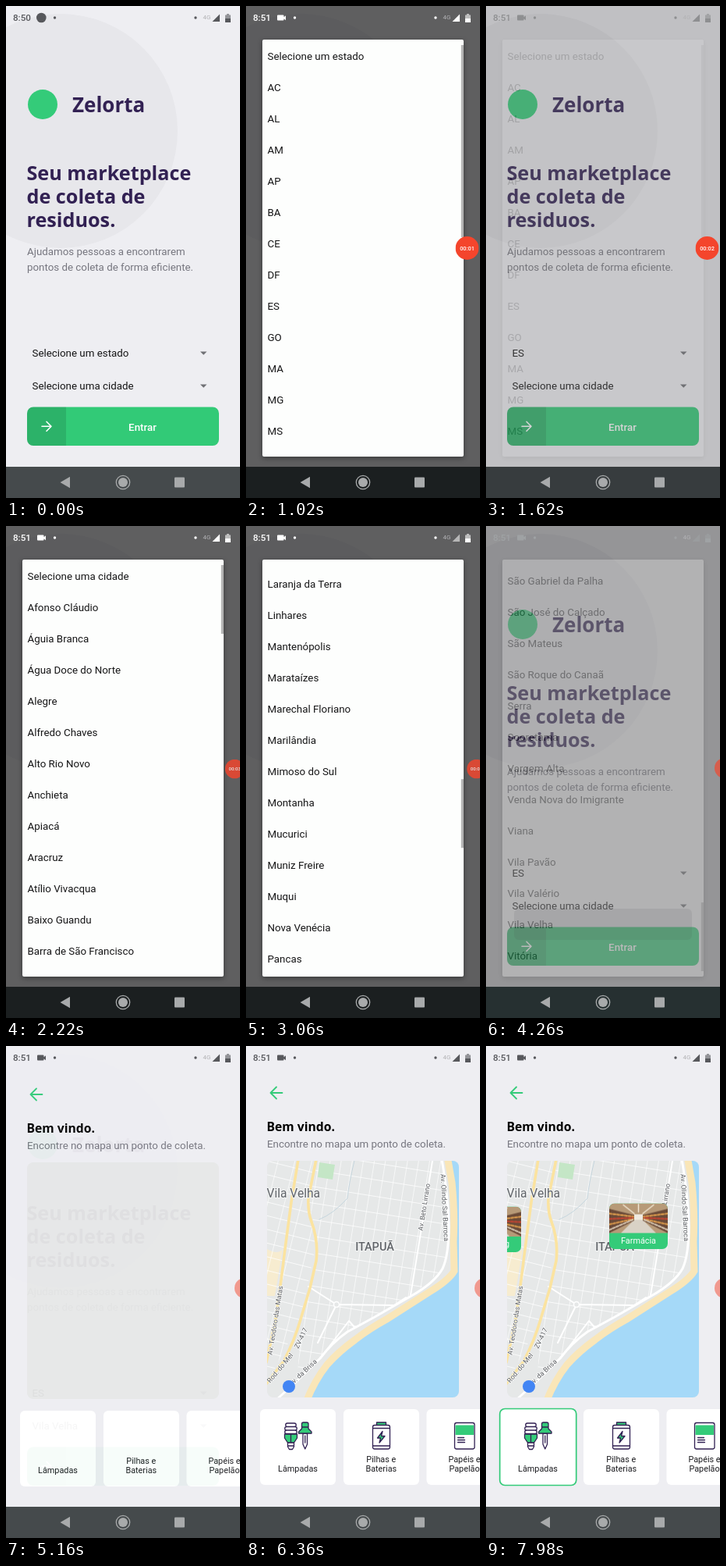
These frames come from a looping animation (300 by 630 pixels, 8 s). An HTML page:

```html
<!DOCTYPE html>
<html lang="pt-BR">
<head>
<meta charset="utf-8">
<title>Coleta de resíduos</title>
<style>
html, body { margin: 0; width: 300px; height: 630px; overflow: hidden; background: #eeeef2; }
svg { display: block; font: 13.33px Roboto, sans-serif; }
.title { font-family: "Open Sans", sans-serif; font-weight: 700; }
.mid { text-anchor: middle; }
.grey { fill: #76767f; }
.small { font-size: 10.83px; text-anchor: middle; fill: #1c1c20; }
.street text { font-size: 8.8px; fill: #55585c; stroke: #fff; stroke-width: 1.4px; paint-order: stroke; }
.place { fill: #5f6368; stroke: #f4f5f5; stroke-width: 2px; paint-order: stroke; }
.line { fill: none; stroke-linecap: round; stroke-linejoin: round; }
.dialog { transform-origin: 150px 310px; }
.paper { fill: #fdfefd; filter: drop-shadow(0 2px 3px #0006); }

[class*="a-"] { animation: 8s linear infinite; }
.a-dim { animation-name: dim; }
.a-nav { animation-name: nav; }
.a-ink { animation-name: ink; }
.a-states { animation-name: states; }
.a-cities { animation-name: cities; }
.a-scroll { animation-name: scroll; animation-timing-function: cubic-bezier(.3, .4, .5, 1); }
.a-thumb { animation-name: thumb; animation-timing-function: cubic-bezier(.3, .4, .5, 1); }
.a-bubble { animation-name: bubble; }
.a-page { animation-name: page; animation-timing-function: ease-out; }
.a-press { animation-name: press; }
.a-tap { animation-name: tap; }
.a-roads { animation-name: roads; }
.a-names { animation-name: names; }
.a-toast { animation-name: toast; }
.a-signal, .a-before, .a-after, .a-noState, .a-state, .a-noCity, .a-city,
.a-icons, .a-picked, .a-photo { animation-timing-function: step-end; }
.a-signal { animation-name: signal; }
.a-before { animation-name: before; }
.a-after { animation-name: after; }
.a-noState { animation-name: noState; }
.a-state { animation-name: state; }
.a-noCity { animation-name: noCity; }
.a-city { animation-name: city; }
.a-icons { animation-name: icons; }
.a-picked { animation-name: picked; }
.a-photo { animation-name: photo; }

@keyframes dim {
  0%, 10.5%, 21%, 23.25%, 54.75%, 100% { opacity: 0; }
  12.4%, 18.75%, 25.2%, 52.5% { opacity: .6; }
  53.25% { opacity: .38; }
}
@keyframes nav {
  0%, 10.5%, 21%, 23.25%, 54.75%, 100% { fill: #454a4c; }
  12.4%, 18.75%, 25.2%, 52.5% { fill: #1b1f20; }
  53.25% { fill: #263031; }
}
@keyframes ink {
  0%, 10.5%, 21%, 23.25%, 54.75%, 100% { fill: #57585c; }
  12.4%, 18.75%, 25.2%, 52.5% { fill: #fff; }
  53.25% { fill: #a0a3a5; }
}
@keyframes states {
  0%, 10.5% { opacity: 0; transform: scale(.94); }
  12.4%, 18.75% { opacity: 1; transform: none; }
  19.5% { opacity: .28; }
  21%, 100% { opacity: 0; transform: none; }
}
@keyframes cities {
  0%, 23.25% { opacity: 0; transform: scale(.94); }
  25.2%, 52.5% { opacity: 1; transform: none; }
  53.25% { opacity: .28; }
  54.75%, 100% { opacity: 0; transform: none; }
}
@keyframes scroll {
  0%, 30.75% { transform: none; }
  38.25% { transform: translateY(-1668.5px); }
  42.5% { transform: translateY(-1960px); }
  50%, 100% { transform: translateY(-2633.5px); }
}
@keyframes thumb {
  0%, 30.75% { transform: none; }
  38.25% { transform: translateY(274px); }
  42.5% { transform: translateY(322px); }
  50%, 100% { transform: translateY(432px); }
}
@keyframes bubble {
  0%, .75% { opacity: 0; transform: translate(283.5px, 310px); }
  3%, 24% { opacity: 1; transform: translate(283.5px, 310px); }
  27% { opacity: .82; transform: translate(293px, 311px) scale(.82); }
  38.25%, 44% { opacity: .82; transform: translate(295.5px, 311px) scale(.82); }
  52.5% { opacity: .7; transform: translate(306px, 310px) scale(.87); }
  65%, 100% { opacity: .5; transform: translate(306px, 310px) scale(.87); }
}
@keyframes page {
  0%, 60.5% { opacity: 0; transform: translateY(50px); }
  65.25%, 100% { opacity: 1; transform: none; }
}
@keyframes press { 0%, 59%, 62%, 100% { opacity: 1; } 60% { opacity: .7; } }
@keyframes tap { 0%, 89%, 92.25%, 100% { opacity: 1; } 90.2% { opacity: .5; } }
@keyframes roads { 0%, 68.25% { opacity: 0; } 75%, 100% { opacity: 1; } }
@keyframes names { 0%, 74% { opacity: 0; } 78%, 100% { opacity: 1; } }
@keyframes toast { 0%, 52.5%, 54.75%, 100% { opacity: 0; } 53.25% { opacity: .1; } }
@keyframes signal { 0%, 54%, 100% { opacity: 1; } 32.25% { opacity: .55; } }
@keyframes before { 0% { opacity: 1; } .75%, 100% { opacity: 0; } }
@keyframes after { 0% { opacity: 0; } .75%, 100% { opacity: 1; } }
@keyframes noState { 0% { opacity: 1; } 18.75%, 100% { opacity: 0; } }
@keyframes state { 0% { opacity: 0; } 18.75%, 100% { opacity: 1; } }
@keyframes noCity { 0% { opacity: 1; } 54%, 100% { opacity: 0; } }
@keyframes city { 0% { opacity: 0; } 54%, 100% { opacity: 1; } }
@keyframes icons { 0% { opacity: 0; } 68.25%, 100% { opacity: 1; } }
@keyframes picked { 0% { opacity: 0; } 92.25%, 100% { opacity: 1; } }
@keyframes photo { 0% { opacity: 0; } 94.5%, 100% { opacity: 1; } }
</style>
</head>
<body>
<svg width="300" height="630" viewBox="0 0 300 630">
  <defs>
    <clipPath id="sheet"><rect x="21" y="43" width="258" height="534" rx="2"/></clipPath>
    <clipPath id="mapBox"><rect x="27" y="147" width="246" height="303" rx="8"/></clipPath>
    <clipPath id="town"><path d="M89 140H251L260 200V250L251 287L212 320L130 366L66 425L70 350L90 275L91 250L80 195Z"/></clipPath>
    <clipPath id="west"><path d="M27 147H89L80 195L91 250L70 350L27 432Z"/></clipPath>
    <clipPath id="pin"><rect width="75" height="58.5" rx="7"/></clipPath>
    <pattern id="blocks" width="14" height="21" patternUnits="userSpaceOnUse" patternTransform="translate(150 147) rotate(9)">
      <path d="M0 0H14M0 0V21" stroke="#fff" stroke-width="1.3"/>
    </pattern>
    <pattern id="lanes" width="21" height="17" patternUnits="userSpaceOnUse" patternTransform="translate(40 150) rotate(14)">
      <path d="M0 0H21M0 0V17" stroke="#fff" stroke-width="1.3"/>
    </pattern>
    <g id="shop">
      <path fill="#b79a78" d="M0 0H75V38H0Z"/>
      <path class="line" stroke="#f1e6d2" stroke-width="1.5" d="M18 2L32 13M57 2L43 13M37.500 1V11"/>
      <path fill="#d9d2c6" d="M32 21H43L60 38H15Z"/>
      <path fill="#f0eadf" d="M32 14H43V21H32Z"/>
      <path fill="#6a4a38" d="M0 7L32 15V22L0 38ZM75 7L43 15V22L75 38Z"/>
      <g class="line" stroke-width="2" stroke-dasharray="3 2">
        <path stroke="#e3a04e" d="M0 13L31 17M75 13L44 17M0 27L31 20M75 27L44 20"/>
        <path stroke="#c94432" d="M0 20L30 18.500M75 20L45 18.500"/>
        <path stroke="#d8c9b4" d="M0 34L30 21M75 34L45 21"/>
      </g>
    </g>
  </defs>

  <rect width="300" height="630" fill="#eeeef2"/>
  <g id="home">
    <circle cx="70" cy="160" r="150" fill="#e7e7eb"/>
    <circle cx="47" cy="126" r="19" fill="#34cb79"/>
    <g class="title" fill="#322153">
      <text x="85" y="136" font-size="26">Zelorta</text>
      <g font-size="25.2">
        <text x="26.500" y="223">Seu marketplace</text>
        <text x="26.500" y="253">de coleta de</text>
        <text x="26.500" y="283">residuos.</text>
      </g>
    </g>
    <g class="grey">
      <text x="27" y="318.5">Ajudamos pessoas a encontrarem</text>
      <text x="27" y="338.5">pontos de coleta de forma eficiente.</text>
    </g>
    <g fill="#161617">
      <text class="a-noState" x="33.5" y="449">Selecione um estado</text>
      <text class="a-state" x="33.5" y="449">ES</text>
      <text class="a-noCity" x="33.5" y="491">Selecione uma cidade</text>
      <text class="a-city" x="33.5" y="491">Vila Velha</text>
    </g>
    <path fill="#707176" d="M249 442.500h8.500l-4.250 4.300zM249 484.500h8.500l-4.250 4.300z"/>
    <g class="a-press">
      <rect x="27" y="513.500" width="246" height="49.500" rx="8" fill="#32ca77"/>
      <path fill="#000" opacity=".12" d="M77 513.500H35a8 8 0 0 0-8 8V555a8 8 0 0 0 8 8H77Z"/>
      <path class="line" stroke="#fff" stroke-width="1.6" d="M46 538.300h12m-6-6 6 6-6 6"/>
      <text class="mid" x="175" y="543.500" fill="#fff" font-weight="500">Entrar</text>
    </g>
  </g>

  <g class="a-page">
    <rect width="300" height="680" fill="#eeeef2"/>
    <path class="line" stroke="#34cb79" stroke-width="1.8" d="M46.500 60H31.500m7.500-7.500L31.500 60l7.500 7.500"/>
    <text class="title" x="26.500" y="109" font-size="15.700">Bem vindo.</text>
    <text class="grey" x="27" y="130.300">Encontre no mapa um ponto de coleta.</text>

    <g clip-path="url(#mapBox)">
      <rect x="27" y="147" width="246" height="303" fill="#e6e8e8"/>
      <g class="a-roads">
        <path fill="#a5d9f8" stroke="#f9e6b8" stroke-width="9" d="M257 135L264 175Q268 215 266 250L267 288Q260 300 235 315L180 350Q158 362 140 376Q118 392 104 408Q88 428 77 456H320V135Z"/>
        <path fill="#f7ecd0" d="M27 260q14 8 20 0l-10 60H27Z"/>
        <rect x="27" y="147" width="246" height="303" fill="url(#blocks)" clip-path="url(#town)"/>
        <rect x="27" y="147" width="246" height="303" fill="url(#lanes)" clip-path="url(#west)"/>
        <path fill="#c4e6c6" d="M94 149l20 3-3 19-19-3z"/>
        <path class="line" stroke="#c5d5dd" stroke-width="1" d="M139 147Q132 175 130 195Q112 215 94 222"/>
        <g class="line" stroke="#fff">
          <path stroke-width="3" d="M251 145Q259 190 260 230Q260 268 252 285Q242 303 212 320L165 347L130 366Q110 380 95 400L60 434L40 452"/>
          <path stroke-width="2" d="M239 147L211 319M116 331L190 332L205 322M116 331L80 308M116 331L92 380M95 400L132 352L139 360"/>
        </g>
        <circle cx="116" cy="331" r="3.500" fill="#e6e8e8" stroke="#fff" stroke-width="1.500"/>
        <g class="line" stroke="#fbe3a0" stroke-width="3.600">
          <path d="M67 145L58 200L50 260L45 300L38 350L26 405"/>
          <path d="M90 145L80 195Q79 212 84 225Q93 250 90 275L82 310L70 350Q62 378 48 404L25 434"/>
        </g>
      </g>
      <g class="a-names">
        <text class="place" x="26.500" y="194" font-size="15.600">Vila Velha</text>
        <text class="place mid" x="165" y="262" font-size="14.500" font-weight="500">ITAPUÃ</text>
        <g class="street">
          <text transform="translate(249.500 164) rotate(87)">Av. Olindo Sal Barroca</text>
          <text transform="translate(226.500 237) rotate(-81)">Av. Beto Lirrano</text>
          <text transform="translate(33.500 396) rotate(-81)">Av. Teodoro das Matas</text>
          <text transform="translate(67 388) rotate(-64)">ZV-417</text>
          <text transform="translate(31 432) rotate(-50)">Rod. do Mel</text>
          <text transform="translate(58 436) rotate(-43)">Av. da Brisa</text>
        </g>
        <circle cx="55" cy="436" r="8" fill="#4285f4"/>
      </g>
      <g class="a-picked">
        <g transform="translate(158 201.500)" clip-path="url(#pin)">
          <rect width="75" height="58.500" fill="#34cb79"/>
          <use href="#shop" class="a-photo"/>
          <text class="mid" x="37.500" y="51.500" font-size="10.830" fill="#fff">Farmácia</text>
        </g>
        <g transform="translate(-30 205.500)" clip-path="url(#pin)">
          <rect width="75" height="58.500" fill="#34cb79"/>
          <use href="#shop" class="a-photo"/>
          <text x="60" y="51.500" font-size="10.830" text-anchor="end" fill="#fff">Recolhe g</text>
        </g>
      </g>
    </g>

    <g fill="#fff">
      <rect x="125" y="465" width="97" height="97" rx="6"/>
      <rect x="231.500" y="465" width="97" height="97" rx="6"/>
    </g>
    <g class="a-tap">
      <rect x="18" y="465" width="97" height="97" rx="6" fill="#fff"/>
      <text class="small" x="66.500" y="545">Lâmpadas</text>
      <g class="line a-icons" stroke="#322153" stroke-width="1.300">
        <path fill="#fff" d="M53 483h9a2 2 0 0 1 0 4.500h-9a2 2 0 0 1 0-4.500ZM52 487.500h11a2 2 0 0 1 0 4.500H52a2 2 0 0 1 0-4.500ZM52 492h11a2 2 0 0 1 0 4.500H52a2 2 0 0 1 0-4.500Z"/>
        <path fill="#34cb79" d="M49.500 497h16v5l-4 6h-8l-4-6Z"/>
        <path fill="#fff" d="M53.500 508h8v5l-2 3.500h-4l-2-3.500ZM53.500 512h8M57.500 497v11"/>
        <path fill="#fff" d="M73 496h5.500v14l-2.750 6-2.750-6ZM75.750 499v9"/>
        <path fill="#34cb79" d="M67.500 496v-2l4-4v-6q0-2 2-2h4.500q2 0 2 2v6l4 4v2ZM71.500 488h8.500"/>
      </g>
    </g>
    <rect class="a-picked" x="17.700" y="464.500" width="98" height="98" rx="6.500" fill="none" stroke="#34cb79" stroke-width="1.700"/>
    <g class="small">
      <text x="173.300" y="532.500">Pilhas e</text>
      <text x="173.300" y="545">Baterias</text>
      <text x="280" y="532.500">Papéis e</text>
      <text x="280" y="545">Papelão</text>
    </g>
    <g class="line a-icons" stroke="#322153" stroke-width="1.300">
      <path fill="#34cb79" d="M167.500 486v-4h12v4Z"/>
      <rect x="162.500" y="485.500" width="22" height="30.500" rx="2.500" fill="#fff"/>
      <path d="M163 489.500h21M163 512h21"/>
      <path fill="#34cb79" d="M175 493.500l-6.500 8.500h4l-1.500 6 7-8.500h-4.500Z"/>
      <rect x="267.500" y="482.500" width="25.500" height="33.500" rx="2.500" fill="#fff"/>
      <path fill="#34cb79" stroke="none" d="M268.500 485.500h23.500V498h-23.500Z"/>
      <path d="M271.500 501.500h8M271.500 504.500h9M271.500 507.500h9"/>
    </g>
  </g>

  <rect class="a-dim" width="300" height="590" opacity="0"/>
  <rect class="a-toast" x="36" y="490" width="228" height="40" rx="6" opacity="0"/>
  <g class="dialog a-states">
    <rect class="paper" x="21" y="43" width="258" height="534" rx="2"/>
    <g id="states" clip-path="url(#sheet)"></g>
    <rect x="275.800" y="50" width="3.200" height="246" fill="#b4b4b4"/>
  </g>
  <g class="dialog a-cities">
    <rect class="paper" x="21" y="43" width="258" height="534" rx="2"/>
    <g clip-path="url(#sheet)"><g id="cities" class="a-scroll"></g></g>
    <rect class="a-thumb" x="275.800" y="50" width="3.200" height="88" fill="#b4b4b4"/>
  </g>

  <g class="a-ink">
    <g class="a-before">
      <text x="9" y="19.300" font-size="11.670" font-weight="500">8:50</text>
      <circle cx="45.300" cy="15" r="6.300"/>
    </g>
    <g class="a-after">
      <text x="9" y="19.300" font-size="11.670" font-weight="500">8:51</text>
      <path d="M41 11.500h6.500q1 0 1 1v1.700l2.500-2v6l-2.500-2v1.300q0 1-1 1H41q-1 0-1-1v-5q0-1 1-1Z"/>
    </g>
    <circle cx="62.500" cy="15" r="1.700"/>
    <circle cx="243" cy="15" r="1.700"/>
    <path class="a-signal" d="M264.500 20h9.500v-9.500Z"/>
    <path opacity=".6" d="M281 11.500h2v-1.500h3v1.500h2V21h-7Z"/>
    <path d="M281 16h7v5h-7Z"/>
  </g>
  <text x="252.500" y="16.500" font-size="8" fill="#b2b2b5">4G</text>

  <g class="a-bubble">
    <circle r="15" fill="#f4452c"/>
    <text id="clock" class="mid" y="2.600" font-size="7.400" font-weight="500" fill="#fff">00:01</text>
  </g>

  <rect class="a-nav" y="590" width="300" height="40" fill="#454a4c"/>
  <g fill="#a8aaab">
    <path d="M69.500 610l12.500-7.300v14.600Z"/>
    <circle cx="150" cy="610" r="6"/>
    <circle cx="150" cy="610" r="8.700" fill="none" stroke="#a8aaab" stroke-width="1.300"/>
    <rect x="216" y="603.500" width="13" height="13" rx="1"/>
  </g>
</svg>
<script>
const $ = id => document.getElementById(id);

function fill(id, names) {
  $(id).innerHTML = names.split(",")
    .map((name, i) => `<text x="27.5" y="${68.5 + 40 * i}" fill="#161617">${name}</text>`).join("");
}

fill("states", "Selecione um estado,AC,AL,AM,AP,BA,CE,DF,ES,GO,MA,MG,MS,MT");
fill("cities", "Selecione uma cidade,Afonso Cláudio,Águia Branca,Água Doce do Norte,Alegre,Alfredo Chaves," +
  "Alto Rio Novo,Anchieta,Apiacá,Aracruz,Atílio Vivacqua,Baixo Guandu,Barra de São Francisco,Boa Esperança," +
  "Bom Jesus do Norte,Brejetuba,Cachoeiro de Itapemirim,Cariacica,Castelo,Colatina,Conceição da Barra," +
  "Conceição do Castelo,Divino de São Lourenço,Domingos Martins,Dores do Rio Preto,Ecoporanga,Fundão," +
  "Governador Lindenberg,Guaçuí,Guarapari,Ibatiba,Ibiraçu,Ibitirama,Iconha,Irupi,Itaguaçu,Itapemirim," +
  "Itarana,Iúna,Jaguaré,Jerônimo Monteiro,João Neiva,Laranja da Terra,Linhares,Mantenópolis,Marataízes," +
  "Marechal Floriano,Marilândia,Mimoso do Sul,Montanha,Mucurici,Muniz Freire,Muqui,Nova Venécia,Pancas," +
  "Pedro Canário,Pinheiros,Piúma,Ponto Belo,Presidente Kennedy,Rio Bananal,Rio Novo do Sul," +
  "Santa Leopoldina,Santa Maria de Jetibá,Santa Teresa,São Domingos do Norte,São Gabriel da Palha," +
  "São José do Calçado,São Mateus,São Roque do Canaã,Serra,Sooretama,Vargem Alta,Venda Nova do Imigrante," +
  "Viana,Vila Pavão,Vila Valério,Vila Velha,Vitória");

// The recorder clock runs slightly ahead of the loop.
function tick() {
  const t = performance.now() % 8000;
  $("clock").textContent = t < 4200 ? "00:0" + Math.floor((t + 960) / 1000) : "";
  requestAnimationFrame(tick);
}
tick();
</script>
</body>
</html>
```
